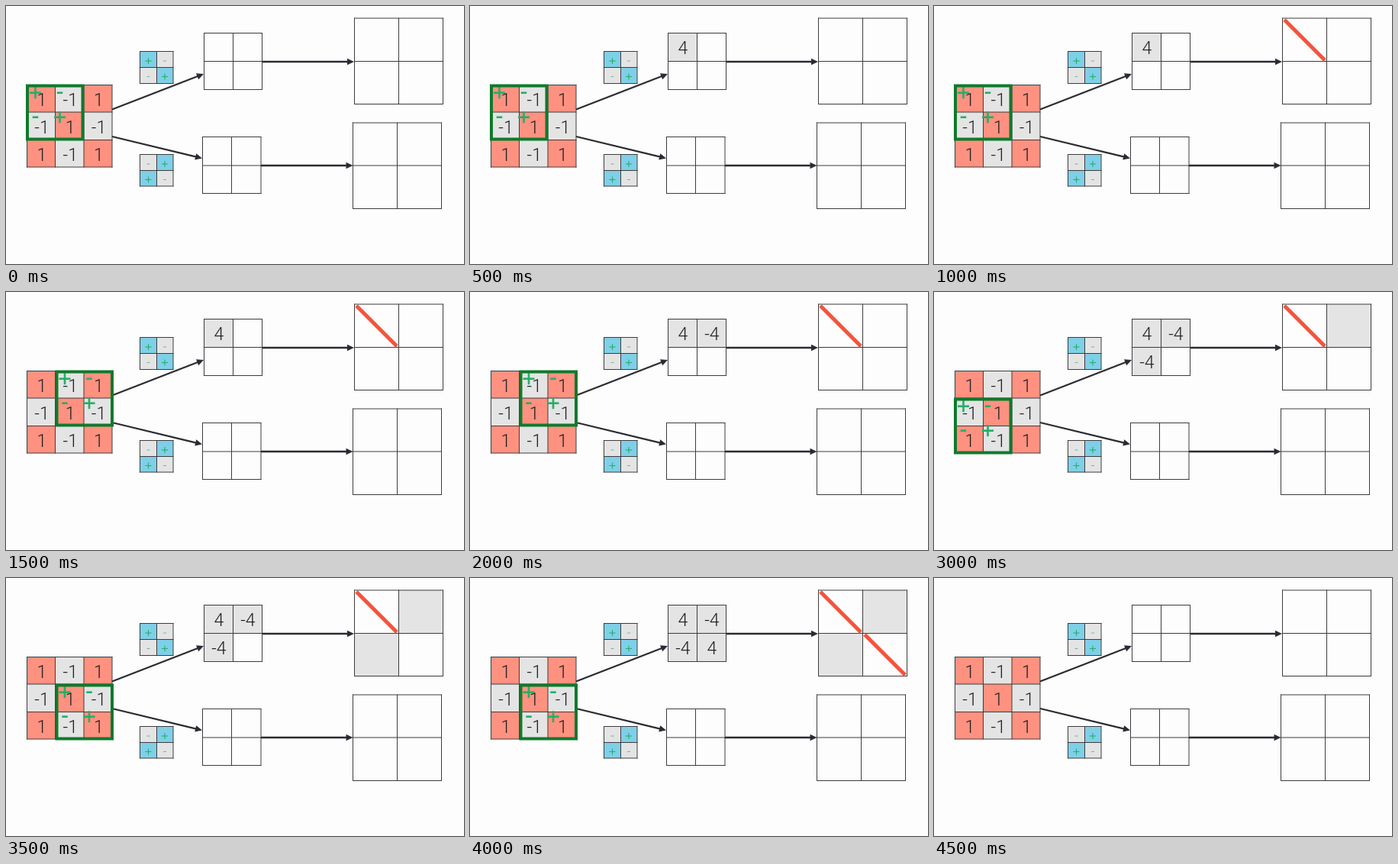
These frames come from a looping animation (600 px wide and 338 px high, 5 s). An HTML page with a canvas:

```html
<!DOCTYPE html>
<html lang="en">
<head>
<meta charset="utf-8">
<title>Convolution steps</title>
<style>
  html, body { margin: 0; width: 100%; height: 100%; overflow: hidden; background: #fdfdfd; }
  canvas { display: block; width: 600px; height: 338px; }
</style>
</head>
<body>
<canvas id="stage"></canvas>
<script>
const canvas = document.getElementById('stage');
const ctx = canvas.getContext('2d');
const ratio = window.devicePixelRatio || 1;
canvas.width = 600 * ratio;
canvas.height = 338 * ratio;

const LOOP = 5000, STEP = 500;
const PAPER = '#fdfdfd', INK = '#2b2b33', RULE = '#3c3c3c';
const CORAL = '#ff9180', GREY = '#e4e4e4', BLUE = '#80cfe8';
const GREEN = '#22b066', FRAME = '#0f7a2c', RED = '#f4533b';

const input = { xs: [27.5, 64.5, 102, 139], ys: [103.5, 139, 175.5, 211] };
const kernels = [
  { xs: [175.5, 197.5, 219], ys: [59.5, 80.5, 101.5], flip: 0 },
  { xs: [175.5, 197.5, 219], ys: [194.5, 215.5, 236], flip: 1 }
];
const sums = [
  { xs: [259.5, 297.5, 335.5], ys: [35.5, 72.5, 109.5] },
  { xs: [257.5, 295.5, 334], ys: [171.5, 209, 245.5] }
];
const outputs = [
  { xs: [456.5, 514.5, 572.5], ys: [16, 72.5, 128.5] },
  { xs: [454.5, 512.5, 570.5], ys: [153, 209, 265.5] }
];
const arrows = [
  [139, 135.5, 259, 89], [139, 171, 257, 199.5],
  [336, 73, 456, 73], [334, 209, 454.5, 209]
];

// Step at which each quadrant's window, sum and output appear
const windowAt = [0, 3, 5, 7], sumAt = [1, 4, 6, 8], outputAt = [2, 5, 7, 8];
const CLEAR = 9;

function line(x1, y1, x2, y2, color, width) {
  ctx.strokeStyle = color;
  ctx.lineWidth = width;
  ctx.beginPath();
  ctx.moveTo(x1, y1);
  ctx.lineTo(x2, y2);
  ctx.stroke();
}

function fillCell(g, col, row, color) {
  ctx.fillStyle = color;
  ctx.fillRect(g.xs[col], g.ys[row], g.xs[col + 1] - g.xs[col], g.ys[row + 1] - g.ys[row]);
}

function rules(g) {
  const { xs, ys } = g, right = xs[xs.length - 1], bottom = ys[ys.length - 1];
  for (const x of xs) line(x, ys[0] - 0.5, x, bottom + 0.5, RULE, 1);
  for (const y of ys) line(xs[0] - 0.5, y, right + 0.5, y, RULE, 1);
}

function label(text, g, col, row, dx) {
  ctx.font = '300 23px Roboto, sans-serif';
  ctx.textAlign = 'center';
  ctx.textBaseline = 'alphabetic';
  ctx.fillStyle = '#222';
  ctx.fillText(text, (g.xs[col] + g.xs[col + 1]) / 2 + dx, (g.ys[row] + g.ys[row + 1]) / 2 + 9.3);
}

function sign(plus, x, y, size, width, color) {
  line(x - size / 2, y, x + size / 2, y, color, width);
  if (plus) line(x, y - size / 2, x, y + size / 2, color, width);
}

function arrow([x1, y1, x2, y2]) {
  const len = Math.hypot(x2 - x1, y2 - y1);
  ctx.save();
  ctx.translate(x1, y1);
  ctx.rotate(Math.atan2(y2 - y1, x2 - x1));
  line(0, 0, len - 7, 0, INK, 2.3);
  ctx.fillStyle = INK;
  ctx.beginPath();
  ctx.moveTo(len, 0);
  ctx.lineTo(len - 9, -4.3);
  ctx.lineTo(len - 9, 4.3);
  ctx.fill();
  ctx.restore();
}

function drawInput() {
  for (let i = 0; i < 9; i++) fillCell(input, i % 3, Math.floor(i / 3), i % 2 ? GREY : CORAL);
  rules(input);
  for (let i = 0; i < 9; i++) label(i % 2 ? '-1' : '1', input, i % 3, Math.floor(i / 3), 1);
}

function drawKernel(k) {
  for (let i = 0; i < 4; i++) {
    const col = i % 2, row = i >> 1, plus = (col + row + k.flip) % 2 === 0;
    fillCell(k, col, row, plus ? BLUE : GREY);
    const x = 186.5 + col * 21.5, y = k.ys[0] + 12.5 + row * 20.5;
    sign(plus, x, y, plus ? 8 : 4, 1.1, plus ? GREEN : '#74bd95');
  }
  rules(k);
}

function drawWindow(q) {
  const col = q % 2, row = q >> 1;
  const left = 28 + col * 38.5, top = 104.5 + row * 36;
  for (let i = 0; i < 4; i++) {
    const c = i % 2, r = i >> 1, plus = c === r;
    const x = 38.5 + col * 38.5 + c * 32, y = 113.7 + row * 36 + r * 32;
    sign(plus, x, y, plus ? 15 : 7.5, 2.6, GREEN);
  }
  ctx.strokeStyle = FRAME;
  ctx.lineWidth = 4;
  ctx.strokeRect(left, top, 72.5, 70);
}

function drawResults(step) {
  const [sum] = sums, [out] = outputs;
  for (let q = 0; q < 4; q++) {
    const col = q % 2, row = q >> 1;
    if (step >= sumAt[q]) fillCell(sum, col, row, GREY);
    if (step >= outputAt[q] && col !== row) fillCell(out, col, row, GREY);
  }
}

function drawMarks(step) {
  for (let q = 0; q < 4; q++) {
    const col = q % 2, row = q >> 1;
    if (step >= sumAt[q]) label(col === row ? '4' : '-4', sums[0], col, row, 0.3);
    if (step >= outputAt[q] && col === row) {
      const x = 459 + col * 58, y = 18 + row * 56;
      line(x, y, x + 53, y + 53, RED, 5);
    }
  }
}

function draw(now) {
  const step = Math.floor((now % LOOP) / STEP);
  const active = step < CLEAR;
  ctx.setTransform(ratio, 0, 0, ratio, 0, 0);
  ctx.fillStyle = PAPER;
  ctx.fillRect(0, 0, 600, 338);
  if (active) drawResults(step);
  [...sums, ...outputs].forEach(rules);
  if (active) drawMarks(step);
  drawInput();
  arrows.forEach(arrow);
  kernels.forEach(drawKernel);
  if (active) drawWindow(windowAt.filter(s => s <= step).length - 1);
}

const start = performance.now();
function tick() {
  draw(performance.now() - start);
  requestAnimationFrame(tick);
}
tick();
</script>
</body>
</html>
```
